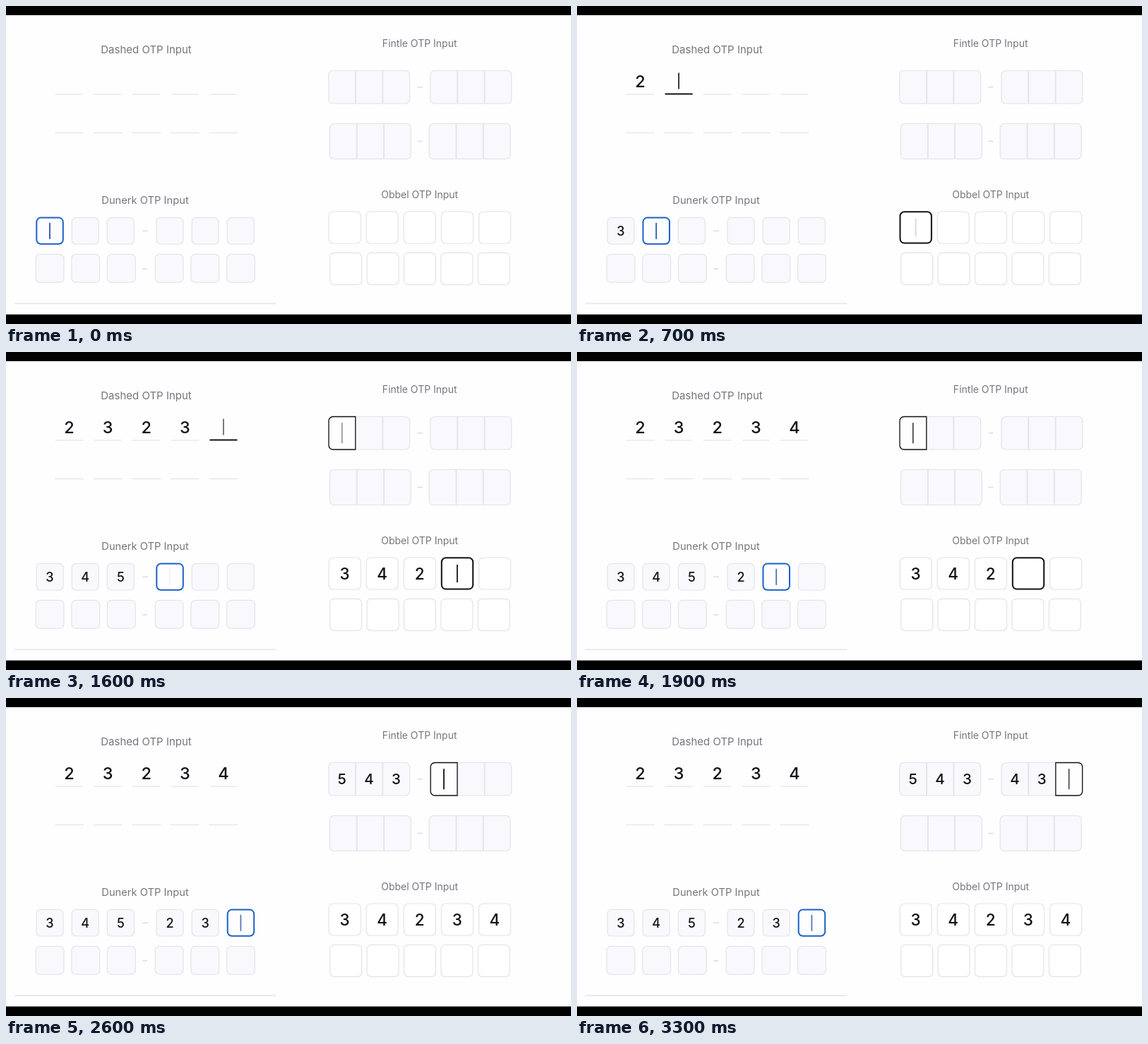
Animation, 800 px wide and 450 px high, one loop 3.4 s. Source, as an HTML page with a canvas:

```html
<!DOCTYPE html>
<html lang="en">
<head>
<meta charset="utf-8">
<title>OTP inputs</title>
<style>
  html, body { margin: 0; width: 100%; height: 100%; overflow: hidden; background: #000; }
  canvas { display: block; width: 800px; height: 450px; }
</style>
</head>
<body>
<canvas id="stage" width="800" height="450"></canvas>
<script>
const ctx = document.getElementById('stage').getContext('2d');
const LOOP = 3400, STEP = 100, BLINK = 350;
const BG = '#fefdff', EDGE = '#e4e3e7', FILL = '#f9f8fc', INK = '#111116', BLUE = '#1a62c6';

// at: the moment each cell takes focus; the last entry of a filled row is the blur
const fields = {
  dashed: { code: '23234', at: [280, 640, 1015, 1260, 1450, 1700], size: 23.5 },
  joined: { code: '543430', at: [1090, 1950, 2170, 2580, 2900, 3180], size: 20.5 },
  boxes: { code: '345230', at: [-30, 660, 920, 1200, 1800, 2490], size: 18 },
  squares: { code: '34234', at: [440, 1030, 1190, 1570, 1990, 2330], size: 22.5 }
};

function rule(x1, x2, y, color = EDGE, width = 1.2) {
  ctx.fillStyle = color;
  ctx.fillRect(x1, y - width / 2, x2 - x1, width);
}

function bar(x, y1, y2, color, width) {
  ctx.fillStyle = color;
  ctx.fillRect(x - width / 2, y1, width, y2 - y1);
}

function box(x, y, w, h, radius, fill, edge = EDGE, width = 1.2) {
  ctx.beginPath();
  ctx.roundRect(x, y, w, h, radius);
  ctx.fillStyle = fill;
  ctx.fill();
  ctx.strokeStyle = edge;
  ctx.lineWidth = width;
  ctx.stroke();
}

function label(text, x, y, size, color, weight) {
  ctx.font = `${weight} ${size}px Inter, "Open Sans", sans-serif`;
  ctx.textAlign = 'center';
  ctx.fillStyle = color;
  ctx.fillText(text, x, y);
}

const title = (name, x, y, size) => label(name + ' OTP Input', x, y, size, '#77767b', 400);

// ease-in-out built from two cubic-bezier(.42, 0, 1, 1) halves
function easeIn(x) {
  let lo = 0, hi = 1;
  for (let i = 0; i < 20; i++) {
    const s = (lo + hi) / 2, r = 1 - s;
    if (1.26 * r * r * s + 3 * r * s * s + s ** 3 < x) lo = s; else hi = s;
  }
  return 3 * (1 - lo) * lo * lo + lo ** 3;
}
const easeInOut = x => x < 0.5 ? easeIn(2 * x) / 2 : 1 - easeIn(2 - 2 * x) / 2;

function blink(age) {
  const p = (age % (2 * BLINK)) / BLINK;
  return p < 1 ? 1 - easeInOut(p) : easeInOut(p - 1);
}

const focusOf = (field, t) => field.at.filter(s => s <= t).length - 1;

// digits already typed, then the blinking caret
function content(field, t, centre, y, caret, color) {
  const focus = focusOf(field, t);
  for (let i = 0; i < focus; i++) {
    label(field.code[i], centre(i), y + field.size * 0.364, field.size, INK, 500);
  }
  if (focus < 0 || focus >= field.code.length) return;
  ctx.globalAlpha = blink(t - field.at[focus]);
  bar(centre(focus), y - caret / 2, y + caret / 2, color, 1.8);
  ctx.globalAlpha = 1;
}

function drawDashed(t) {
  const f = fields.dashed, focus = focusOf(f, t);
  const centre = i => 89.5 + 54.6 * i;
  title('Dashed', 198.5, 67, 15);
  for (let i = 0; i < 5; i++) {
    const c = centre(i);
    if (i === focus) rule(c - 19.5, c + 19.5, 124.5, INK, 2);
    else rule(c - 19.5, c + 19.5, 125);
    rule(c - 20.2, c + 20.2, 179.5);
  }
  content(f, t, centre, 106, 23, INK);
}

function cellGroup(x, y, h) {
  box(x, y, 114.8, h, 6, FILL);
  for (const i of [1, 2]) bar(x + 38.3 * i, y, y + h, EDGE, 1.8);
}

function drawJoined(t) {
  const f = fields.joined, focus = focusOf(f, t);
  const left = i => 456.8 + 38.3 * (i % 3) + (i > 2 ? 144.2 : 0);
  title('Fintle', 585.7, 58, 14);
  cellGroup(456.8, 91.5, 46.5);
  cellGroup(601, 91.5, 46.5);
  cellGroup(458.5, 166.5, 50);
  cellGroup(599.2, 166.5, 50);
  rule(582.5, 589.5, 114.7, '#dddce1', 1.6);
  rule(582.5, 589.5, 191.5, '#dddce1', 1.6);
  if (focus >= 0) {
    const a = focus % 3 === 0 ? 6 : 0, b = focus % 3 === 2 ? 6 : 0;
    box(left(focus) + 0.2, 91.5, 37.8, 46.5, [a, b, b, a], BG, INK, 1.3);
  }
  content(f, t, i => left(i) + 19, 114.7, 29, INK);
}

function drawBoxes(t) {
  const f = fields.boxes, focus = focusOf(f, t);
  const left = i => 43 + 50.2 * i + (i > 2 ? 19.4 : 0);
  title('Dunerk', 197, 279.5, 14.7);
  for (let i = 0; i < 6; i++) {
    if (i === focus) box(left(i) + 0.3, 299.6, 37.5, 37.2, 6, BG, BLUE, 2);
    else box(left(i), 299.3, 38, 37.7, 6, FILL);
    box(42.1 + 50.7 * i + (i > 2 ? 17 : 0), 351.3, 39.8, 39.8, 6, FILL);
  }
  rule(193.3, 201, 318.3, '#dddce1', 1.6);
  rule(193.3, 200, 371.8, '#dddce1', 1.6);
  content(f, t, i => left(i) + 19, 318.3, 23, '#2552a8');
}

function drawSquares(t) {
  const f = fields.squares, focus = focusOf(f, t);
  const left = i => 457.2 + 53.1 * i;
  title('Obbel', 585.7, 272, 14);
  for (let i = 0; i < 5; i++) {
    if (i === focus) box(left(i) + 0.3, 291.2, 44.4, 44.4, 6, '#fff', INK, 2);
    else box(left(i), 291, 45, 45, 6, '#fff');
    box(458.7 + 52.4 * i, 349.3, 45, 45, 6, '#fff');
  }
  content(f, t, i => left(i) + 22.4, 313.5, 25, INK);
}

function draw(t) {
  ctx.fillStyle = '#000';
  ctx.fillRect(0, 0, 800, 450);
  ctx.fillStyle = BG;
  ctx.fillRect(0, 13, 800, 423.5);
  rule(12, 382, 421, '#e0dfe3');
  drawDashed(t);
  drawJoined(t);
  drawBoxes(t);
  drawSquares(t);
}

function tick(now) {
  draw(Math.floor((now % LOOP) / STEP) * STEP);
  requestAnimationFrame(tick);
}
draw(0);
requestAnimationFrame(tick);
</script>
</body>
</html>
```
